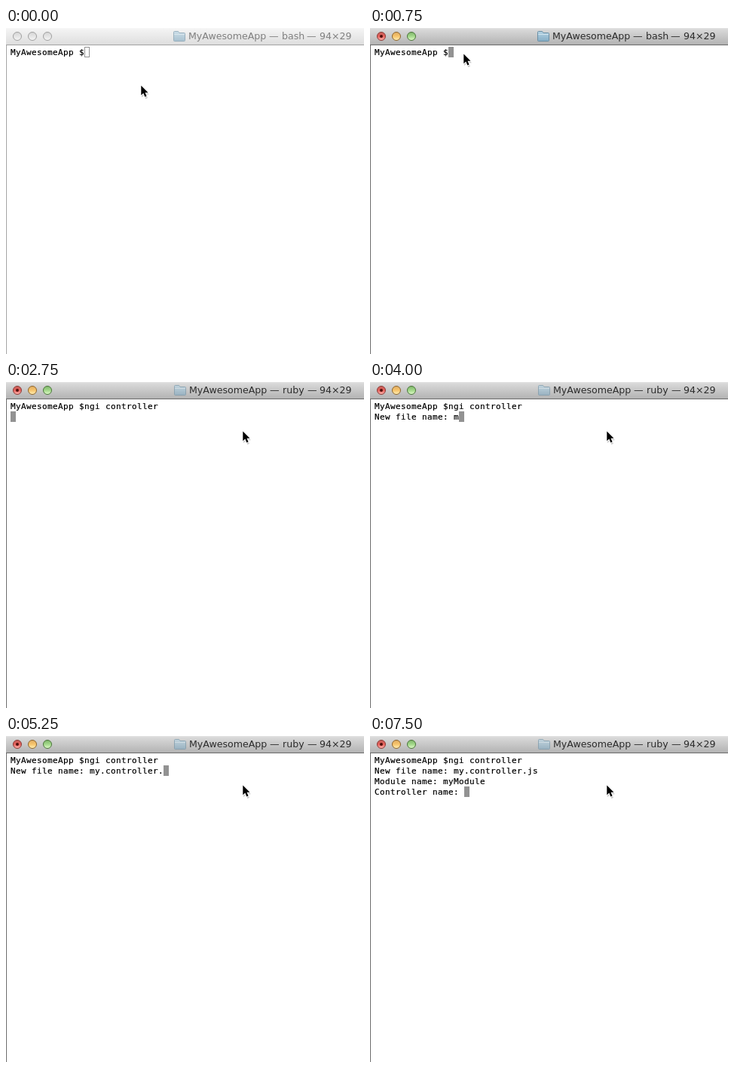
These frames come from a looping animation (475 by 433 pixels, 8 s). An HTML page:

```html
<!DOCTYPE html>
<html lang="en">
<head>
<meta charset="utf-8">
<title>Terminal session</title>
<style>
  html, body { margin: 0; width: 100%; height: 100%; overflow: hidden; background: #fff; }
  #window { position: relative; width: 475px; height: 433px; overflow: hidden; background: #fff; }
  #window::before {
    content: ""; position: absolute; left: 0; top: 23px; bottom: 0; width: 1px; background: #6f6f6f;
  }
  .idle#window::before { background: #a5a5a5; }
  svg { position: absolute; left: 0; top: 0; }
  #bar {
    position: absolute; width: 475px; height: 22px;
    background: linear-gradient(#e6e6e6, #d9d9d9 8%, #b3b3b3);
    border-bottom: 1px solid #6a6a6a;
  }
  .idle #bar { background: linear-gradient(#f8f8f8, #f3f3f3 8%, #dedede); border-color: #a2a2a2; }
  .title { font: 12.6px "DejaVu Sans", sans-serif; fill: #2c2c2c; }
  .idle .title { fill: #808080; }
  .idle .lit { display: none; }
  .gray { display: none; }
  .idle .gray { display: inline; }
  .busy #folder, .idle #folder { opacity: .62; }
  .busy #folder { transform: translateX(1px); }
  #text {
    position: absolute; left: 6px; top: 26px; margin: 0;
    font: 11px/14px "DejaVu Sans Mono", monospace;
    letter-spacing: calc(7px - 1ch);
    color: #000; -webkit-text-stroke: .2px #000;
  }
  #cursor {
    position: absolute; box-sizing: border-box; width: 7px; height: 14px; background: #929292;
  }
  .idle #cursor { background: none; border: 1px solid #929292; }
</style>
</head>
<body>
<div id="window" class="idle">
  <div id="bar"></div>
  <svg width="475" height="23">
    <defs>
      <linearGradient id="red" x2="0" y2="1">
        <stop stop-color="#c4605a"/><stop offset=".5" stop-color="#e8615b"/><stop offset="1" stop-color="#ffbab4"/>
      </linearGradient>
      <linearGradient id="amber" x2="0" y2="1">
        <stop stop-color="#dfab62"/><stop offset=".5" stop-color="#f8c56c"/><stop offset="1" stop-color="#fff2ba"/>
      </linearGradient>
      <linearGradient id="green" x2="0" y2="1">
        <stop stop-color="#7fb56a"/><stop offset=".5" stop-color="#a3d98a"/><stop offset="1" stop-color="#e2fccb"/>
      </linearGradient>
      <linearGradient id="pale" x2="0" y2="1">
        <stop stop-color="#d5d5d5"/><stop offset="1" stop-color="#f5f5f5"/>
      </linearGradient>
      <linearGradient id="blue" x2="0" y2="1">
        <stop stop-color="#b5d3e3"/><stop offset="1" stop-color="#85adc5"/>
      </linearGradient>
    </defs>
    <g class="lit">
      <circle cx="15" cy="11" r="5.5" fill="url(#red)" stroke="#8a3b37"/>
      <circle cx="15" cy="11" r="2" fill="#50100e"/>
      <circle cx="35" cy="11" r="5.5" fill="url(#amber)" stroke="#8c652e"/>
      <circle cx="55" cy="11" r="5.5" fill="url(#green)" stroke="#4a743b"/>
    </g>
    <g class="gray" fill="url(#pale)" stroke="#a0a0a0">
      <circle cx="15" cy="11" r="5.5"/>
      <circle cx="35" cy="11" r="5.5"/>
      <circle cx="55" cy="11" r="5.5"/>
    </g>
    <g id="folder" stroke="#6a8fa5">
      <path d="M222.5 16.5V5.5Q222.5 4.5 223.5 4.5H228.5L230 6.5H236.5Q237.5 6.5 237.5 7.5V16.5Q237.5 17.5 236.5 17.5H223.5Q222.5 17.5 222.5 16.5Z" fill="url(#blue)"/>
      <path d="M223 8.5H237" stroke="#cfe3ee"/>
    </g>
    <text class="title" id="title" y="15"></text>
  </svg>
  <pre id="text"></pre>
  <div id="cursor"></div>
  <svg id="mouse" width="16" height="22" overflow="visible">
    <path d="M2 3V17L5 14.3L7.2 19L10 18L7.8 13.2H12Z" fill="#000" opacity=".22"/>
    <path d="M1.3 1.5V14.3L4.3 11.6L6.4 16.4L8.6 15.5L6.5 10.8H10.5Z" fill="#000" stroke="#fff" stroke-width="2" paint-order="stroke"/>
  </svg>
</div>
<script>
  const LOOP = 8000;
  const lines = [
    ["MyAwesomeApp $", "ngi controller"],
    ["New file name: ", "my.controller.js"],
    ["Module name: ", "myModule"],
    ["Controller name: ", ""]
  ];
  // [time, row, typed characters]; -1 means the prompt is not printed yet
  const typing = [
    [0, 0, 0], [1500, 0, 2], [1750, 0, 6], [2000, 0, 8], [2250, 0, 11], [2500, 0, 14],
    [2750, 1, -1], [3250, 1, 0], [4000, 1, 1], [4250, 1, 3], [4500, 1, 7],
    [4750, 1, 9], [5000, 1, 11], [5250, 1, 14],
    [5750, 2, 0], [6500, 2, 1], [6750, 2, 3], [7000, 2, 5], [7250, 2, 8],
    [7500, 3, 0]
  ];
  // [time, x, y]
  const moves = [[0, 178, 75], [250, 124, 34], [750, 123, 33], [1000, 313, 64]];

  const el = id => document.getElementById(id);
  const stepAt = (steps, t) => steps.findLast(s => s[0] <= t);

  function setTitle(busy) {
    const words = ["MyAwesomeApp", "—", busy ? "ruby" : "bash", "—", "94×29"];
    const xs = [242, 349, 366, 399, 416];
    el("title").innerHTML = words
      .map((w, i) => `<tspan x="${xs[i] + (busy && i < 4 ? 1 : 0)}">${w}</tspan>`).join("");
  }

  let shown = "";
  function draw(t) {
    const [, row, typed] = stepAt(typing, t);
    const [, x, y] = stepAt(moves, t);
    const mode = t < 750 ? "idle" : t < 2750 ? "ready" : "busy";
    const key = [row, typed, x, y, mode].join();
    if (key === shown) return;
    shown = key;

    const [prompt, input] = lines[row];
    const current = typed < 0 ? "" : prompt + input.slice(0, typed);
    el("text").textContent = [...lines.slice(0, row).map(l => l.join("")), current].join("\n");
    el("cursor").style.left = 6 + 7 * current.length + "px";
    el("cursor").style.top = 25 + 14 * row + "px";
    el("mouse").style.transform = `translate(${x}px, ${y}px)`;
    el("window").className = mode;
    setTitle(mode === "busy");
  }

  const start = performance.now();
  function tick() {
    draw((performance.now() - start) % LOOP);
    requestAnimationFrame(tick);
  }
  tick();
</script>
</body>
</html>
```
